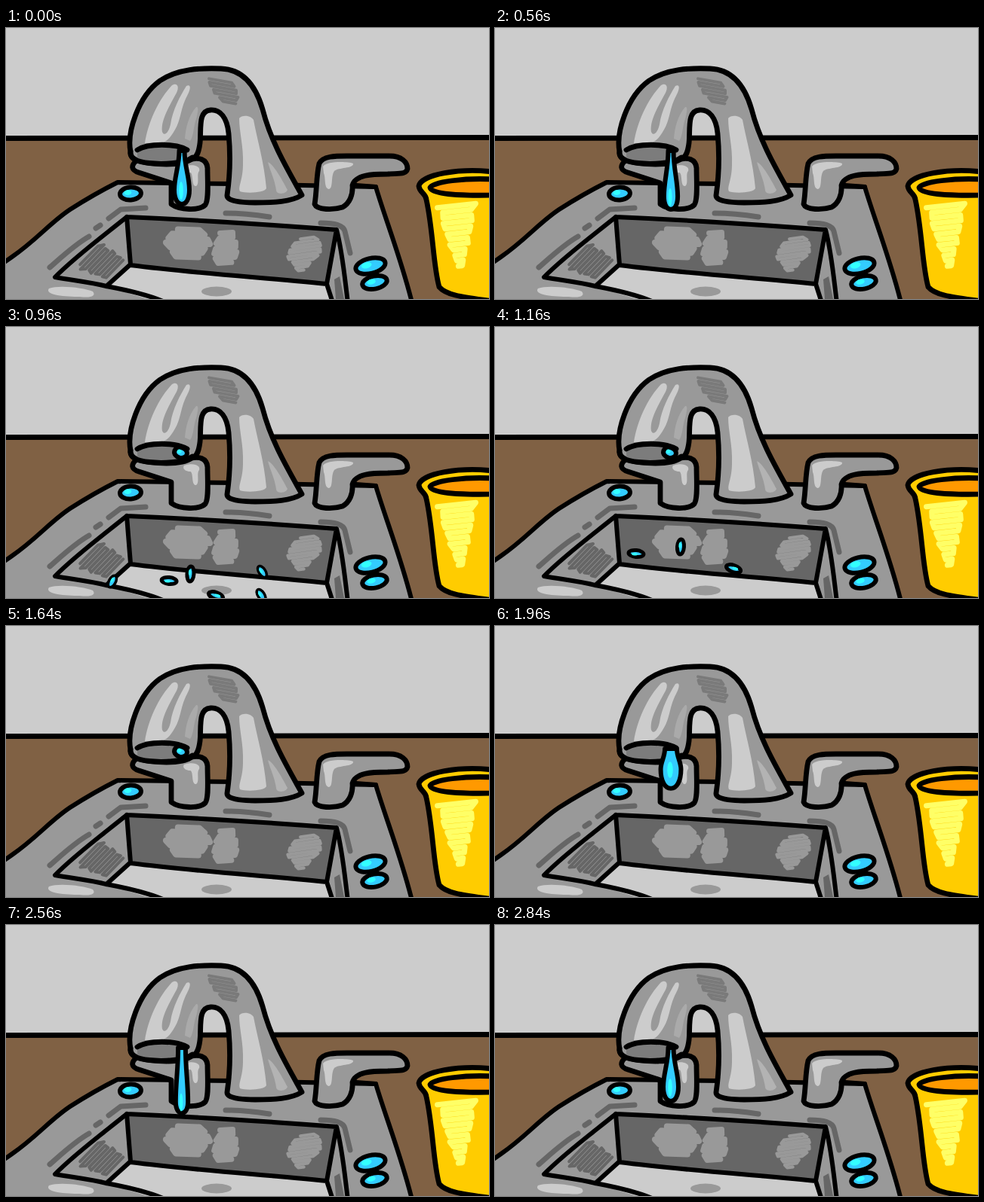
These frames come from a looping animation (640 px wide and 360 px high, 2.88 s). An HTML page:

```html
<!DOCTYPE html>
<html lang="en">
<head>
<meta charset="utf-8">
<title>Dripping tap</title>
<style>
html, body { margin: 0; width: 100%; height: 100%; overflow: hidden; background: #ccc; }
svg { display: block; width: 640px; height: 360px; }
path, ellipse { stroke-linecap: round; stroke-linejoin: round; }
.ink { stroke: #000; stroke-width: 6.8; }
.thin { stroke-width: 6; }
.line, [data-zig] { fill: none; }
.metal { fill: #999; }
.light { fill: #ccc; }
.dark { fill: #666; }
.shade { fill: none; stroke: #666; stroke-width: 7; }
.water { fill: #3cf; stroke: #000; }
.glint { fill: #3ff; }
</style>
</head>
<body>
<svg viewBox="0 0 640 360">
  <!-- wall and counter -->
  <path fill="#ccc" d="M0 0H640V146H0Z"/>
  <path fill="#806144" d="M0 146H640V360H0Z"/>
  <path class="ink line" d="M-5 146.5L645 145.5"/>

  <!-- sink -->
  <path class="ink thin metal" d="M-5 313L8 304C40 282 58 259 85 241C110 225 130 214 148 205L300 207L490 211C502 252 524 308 538 365H-5Z"/>
  <path class="shade" d="M58 318C74 304 92 287 110 277M119 266L125 262M136 253L152 241L185 239M291 246C314 246 330 248 349 251M417 259C436 259 447 262 449 270L456 299"/>
  <path class="light" d="M57 346C70 341 104 345 115 350C120 356 112 359 98 357C80 357 50 355 57 346Z"/>
  <path class="metal" d="M160 251L65 331L135 343L165 315Z"/>
  <path data-zig="110 302 40 144 320 30 9 -46 .1" stroke="#666" stroke-width="4"/>
  <path class="dark" d="M160 251L438 268L425 340L165 314Z"/>
  <path class="light" d="M165 315L425 340L433 364H200L133 343Z"/>
  <path class="metal" d="M438 268L425 340L433 364H453Z"/>
  <path class="dark" d="M435 334L442 330L448 360H437Z"/>
  <path data-zig="242 268 28 240 304 28 7 2 .9" stroke="#999" stroke-width="8"/>
  <path data-zig="292 272 16 290 312 20 7 -4 .5" stroke="#999" stroke-width="7"/>
  <path data-zig="399 279 18 391 322 8 11 -8 2" stroke="#999" stroke-width="4"/>
  <ellipse class="metal" cx="279" cy="350" rx="20" ry="6.5"/>
  <path class="ink thin line" d="M160 251C230 254 360 262 438 268C446 298 449 334 453 365M160 251C128 277 90 305 65 331C94 336 113 338 133 343C160 348 184 353 208 363M160 251L165 314L133 343M165 315C250 326 350 332 425 340L438 268M425 340L433 365"/>
  <path class="ink thin line" d="M464 209L490 211"/>

  <!-- left lever -->
  <path class="ink metal" d="M173 176C165 183 166 189 176 192L219 206L219 234C230 242 256 243 264 235C269 228 267 206 267 186C266 174 255 171 243 175Z"/>
  <path class="light" d="M236 184C247 180 258 183 256 190C252 194 257 207 252 210C245 211 249 193 244 192C238 192 233 188 236 184Z"/>

  <!-- right lever -->
  <path class="ink metal" d="M409 234C412 216 411 196 415 180C420 170 436 170 452 170H508C524 170 532 178 532 187C530 195 521 193 506 194C484 194 463 195 459 209C460 222 455 233 446 238C434 242 412 242 409 234Z"/>
  <path class="light" d="M420 184C424 177 452 177 460 180C461 187 440 185 435 190C430 197 434 212 428 214C421 213 424 199 421 193Z"/>

  <!-- spout -->
  <path class="ink metal" d="M165 164C160 139 175 91 204 70C228 54 258 53 285 54C315 55 331 77 340 108C351 151 372 186 392 222C378 231 355 232 330 232C312 232 292 230 293 222C297 195 297 162 295 140C293 119 284 108 271 109C254 110 259 135 257 153C255 169 251 173 246 174C233 184 194 182 174 176C166 173 164 169 165 164Z"/>
  <path class="light" d="M184 153C188 126 202 95 220 76C227 72 230 78 226 86C214 108 205 124 207 138C210 145 216 138 218 128C221 108 231 90 239 77C245 74 245 80 241 88C231 106 232 122 224 135C217 147 212 152 206 152Z"/>
  <path fill="#aaa" d="M237 147C238 131 243 115 252 105C256 104 254 112 252 121C248 132 249 143 244 150Z"/>
  <path class="light" d="M309 120C313 115 324 116 328 122C333 149 342 178 345 213C343 219 318 220 310 217C307 211 314 202 314 181C315 158 309 138 309 120Z"/>
  <path fill="#b3b3b3" d="M347 178C355 182 365 200 373 215C371 221 358 222 358 215C356 201 350 190 347 178Z"/>
  <path data-zig="284 70 34 296 99 16 7 10 .3" stroke="#7a7a7a" stroke-width="4"/>
  <path fill="#7c7c7c" d="M174 163C188 153 225 153 240 163C241 170 237 174 229 176C208 181 183 178 174 174Z"/>
  <path class="ink line" d="M174 162C188 153 225 153 240 162M165 164C164 175 176 178 190 179.5S236 181 247 172"/>

  <!-- bucket -->
  <path class="ink" fill="#fc0" d="M645 191C602 186 550 194 547 210C548 219 556 219 557 228C566 269 566 316 574 344C584 356 610 358 645 363Z"/>
  <path class="ink" fill="#f90" d="M645 201C610 199 565 204 562 212C563 221 602 223 645 222Z"/>
  <path data-zig="597 236 46 602 316 5 12 -6 .1" stroke="#ff6" stroke-width="7"/>

  <g id="still"></g>
  <g id="moving"></g>
</svg>
<script>
const LOOP = 2880, STEP = 40;
const FORM = 1640, SNAP = 680, HIT = 920; // drop forms, breaks off, lands
const CX = 233, TOP = 163, GRAVITY = .0009;

let seed = 7;
const random = () => (seed = seed * 16807 % 2147483647) / 2147483647;

// Hand-drawn hatching along an axis: x0 y0 width0 x1 y1 width1 rows angle bulge
function hatch(el) {
  const [x0, y0, w0, x1, y1, w1, rows, angle, bulge] = el.dataset.zig.split(" ").map(Number);
  const a = angle * Math.PI / 180;
  let d = "";
  for (let i = 0; i < rows; i++) {
    const k = i / (rows - 1);
    const width = (w0 + (w1 - w0) * k) * (1 + bulge * Math.sin(Math.PI * k)) * (.85 + .3 * random());
    const r = (i % 2 ? 1 : -1) * width / 2;
    const x = x0 + (x1 - x0) * k, y = y0 + (y1 - y0) * k;
    // each row crosses the axis, then the next one returns
    d += `${i ? "L" : "M"}${x + r * Math.cos(a)} ${y + r * Math.sin(a)}L${x - r * Math.cos(a)} ${y - r * Math.sin(a)}`;
  }
  el.setAttribute("d", d);
}

const drop = (x, y, rx, ry, tilt = 0, line = 6) =>
  `<g transform="translate(${x} ${y}) rotate(${tilt})">` +
  `<ellipse class="water" rx="${rx}" ry="${ry}" stroke-width="${line}"/>` +
  `<ellipse class="glint" cx="${-rx * .25}" cy="${-ry * .2}" rx="${rx * .35}" ry="${ry * .4}"/></g>`;

// Lowest point of the hanging water: swell, damped bounce, rest, slow stretch
function lowest(age) {
  if (age < 480) return 174 + 94 * (age / 480) ** 2;
  const s = Math.min(age, 1200) - 480;
  const bounce = 45 * Math.exp(-s / 450) * Math.cos(2 * Math.PI * s / 480);
  return 223 + .028 * s + bounce + 7 * Math.max(0, (age - 1400) / 400) ** 4;
}

function hanging(age) {
  const low = lowest(age);
  const w = Math.min(15, low - 165, 710 / (low - TOP));
  const neck = 3.5 + 6 * Math.max(0, 1 - age / 1200);
  const mid = Math.max(low - w * 1.9, TOP + 4), len = mid - TOP, belly = mid + (low - mid) * .65;
  return `<path class="water" stroke-width="6" d="M${CX - neck} ${TOP}` +
    `C${CX - neck} ${TOP + len * .4} ${CX - w} ${mid - len * .35} ${CX - w} ${mid}` +
    `C${CX - w} ${belly} ${CX - w * .55} ${low} ${CX} ${low}` +
    `C${CX + w * .55} ${low} ${CX + w} ${belly} ${CX + w} ${mid}` +
    `C${CX + w} ${mid - len * .35} ${CX + neck} ${TOP + len * .4} ${CX + neck} ${TOP}Z"/>` +
    `<ellipse class="glint" cx="${CX - 1}" cy="${mid + 1}" rx="${w * .28}" ry="${Math.min(12, len * .4)}"/>`;
}

// Droplets fly away from a centre line; distance sets their speed and tilt
function spray(points, dt, { from, speed, fall, turn, rx, ry, line }) {
  return points.map(([x, y]) => {
    const off = x - from;
    return drop(x + off * speed * dt, y + fall * dt + GRAVITY * dt * dt, rx, ry, off * turn, line);
  }).join("");
}
const snapSpray = { from: 232, speed: .0018, fall: .36, turn: -.42, rx: 4.4, ry: 8.5, line: 3.5 };
const hitSpray = { from: 243, speed: .0026, fall: 0, turn: 1.5, rx: 4.5, ry: 10, line: 5 };

function draw(t) {
  if (t < SNAP || t > FORM) return hanging((t - FORM + LOOP) % LOOP);
  const dt = t - SNAP;
  let out = drop(231.5, 167, 8.5, 6.8, 12);
  if (dt < 160) {
    const tail = 196 + Math.min(26, dt * .33);
    out += `<path class="ink line thin" d="M232.5 ${tail}L231 ${tail + 2}L233 227"/>`;
  }
  if (t < HIT) out += drop(232, 240 + .36 * dt + GRAVITY * dt * dt, 15, 29.5);
  if (dt < 440) out += spray([[165, 230], [179, 270], [311, 217], [310, 248]], dt - 80, snapSpray);
  if (t >= HIT && t < 1480) out += spray([[187, 301], [246, 292], [316, 321]], t - 1160, hitSpray);
  return out;
}

document.querySelectorAll("[data-zig]").forEach(hatch);
document.getElementById("still").innerHTML =
  drop(165, 220, 14, 8.5, -4) + drop(483, 316, 20, 10, -14) + drop(488.5, 338, 16.5, 8.5, -12);

const layer = document.getElementById("moving");
const start = performance.now();
let last = -1;
function tick() {
  const t = Math.floor(((performance.now() - start) % LOOP) / STEP) * STEP;
  if (t !== last) layer.innerHTML = draw(last = t);
  requestAnimationFrame(tick);
}
tick();
</script>
</body>
</html>
```
